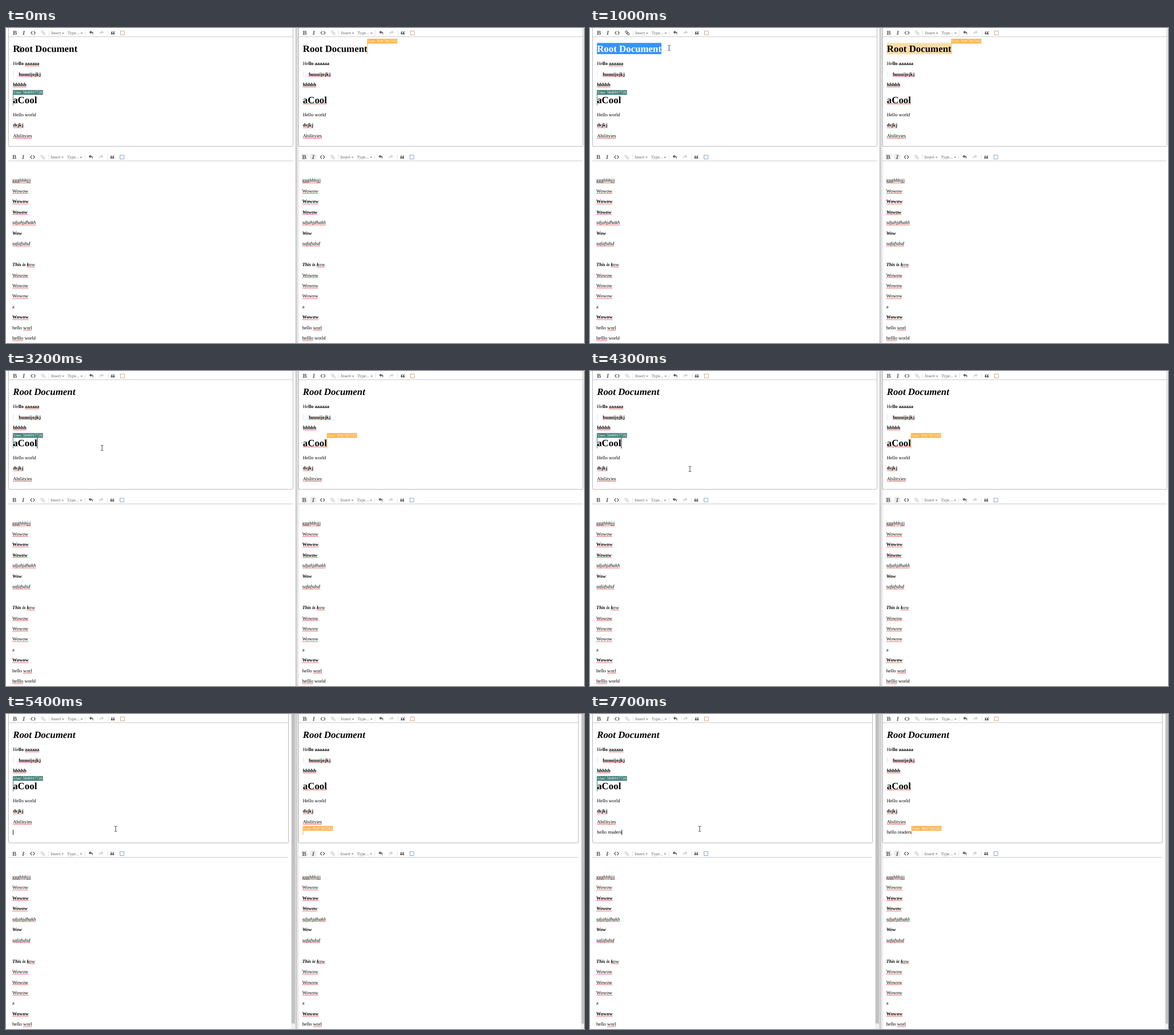
Recreate the animation shown at these times as an HTML page. Size 1012 px wide and 553 px high, loop 8000 ms.

```html
<!DOCTYPE html>
<html lang="en">
<head>
<meta charset="utf-8">
<title>Shared editors</title>
<style>
  html, body { margin: 0; width: 100%; height: 100%; overflow: hidden; background: #fff; }
  svg { display: block; }
  text { font-family: "Liberation Serif", "Times New Roman", serif; white-space: pre; text-rendering: geometricPrecision; }
</style>
</head>
<body>
<svg id="stage" width="1012" height="553" viewBox="0 0 1012 553"></svg>
<script>
const LOOP = 8000;
const BODY = 8.43, HEAD = 16.87, ROW = 18.46, GROW = 18.5;
const SIDE = 507.6, LEFT = 12.2;
const INK = '#5c5c5c', TEAL = '#47807a', ORANGE = '#fbb44b';
const TITLE = 'Root Document', TYPED = 'hello readers';
const stage = document.getElementById('stage');

function set(node, attrs) {
  for (const k in attrs) node.setAttribute(k, attrs[k]);
  return node;
}
function el(parent, tag, attrs = {}) {
  return parent.appendChild(set(document.createElementNS('http://www.w3.org/2000/svg', tag), attrs));
}
function group(parent, x = 0, y = 0) {
  return el(parent, 'g', { transform: `translate(${x} ${y})` });
}
function rect(parent, x, y, width, height, fill, more) {
  return el(parent, 'rect', { x, y, width, height, fill, ...more });
}
function show(node, on) { node.style.display = on ? '' : 'none'; }

// Runs are [string, flags]; flags: b bold, i italic, u misspelt.
function write(parent, x, y, runs, size = BODY) {
  const text = el(parent, 'text', { x, y, 'font-size': size });
  for (const [str, flags = ''] of runs) {
    const span = el(text, 'tspan');
    if (flags.includes('b')) span.setAttribute('font-weight', 'bold');
    if (flags.includes('i')) span.setAttribute('font-style', 'italic');
    span.textContent = str;
    if (flags.includes('u')) {
      const x1 = span.getStartPositionOfChar(0).x, y1 = y + 1.6;
      el(parent, 'line', {
        x1, y1, x2: x1 + span.getComputedTextLength(), y2: y1,
        stroke: '#e04545', 'stroke-width': 0.8
      });
    }
  }
  return text;
}

function toolbar(parent, x, y, frameColor) {
  const g = group(parent, x, y);
  const boldBg = rect(g, 10, 3, 11.5, 10.5, '#ececec', { rx: 2 });
  const italicBg = rect(g, 25.5, 3, 11.5, 10.5, '#ececec', { rx: 2 });
  const glyph = (cx, ch, style) => {
    set(write(g, cx, 12.1, [[ch, style]], 10.8), { 'text-anchor': 'middle', fill: INK });
  };
  glyph(15.6, 'B', 'b');
  glyph(31.2, 'I', 'bi');
  const line = (d, w = 1.3) => el(g, 'path', { d, fill: 'none', stroke: INK, 'stroke-width': w });
  line('M46.4 5.6l-2.6 3 2.6 3M48.6 5.6l2.6 3-2.6 3');

  const link = el(g, 'g', {
    transform: 'translate(65.4 8.6) rotate(45)', fill: 'none', stroke: INK, 'stroke-width': 1.1
  });
  for (const lx of [-4.3, -0.5]) el(link, 'rect', { x: lx, y: -1.5, width: 4.8, height: 3, rx: 1.4 });

  for (const [lx, label, arrow] of [[79, 'Insert', 100], [107.8, 'Type...', 132.4]]) {
    set(write(g, lx, 11.4, [[label]], 7.59), { fill: '#666' });
    el(g, 'path', { d: `M${arrow - 2.1} 8.2h4.2l-2.1 2.2z`, fill: '#888' });
  }
  for (const sx of [75.2, 139, 178.3]) rect(g, sx - 0.3, 4, 0.8, 9.4, '#ddd');

  const arrow = (ax, d, opacity) => el(g, 'path', {
    d, fill: INK, opacity, transform: `translate(${ax} 4.3) scale(.00823)`
  });
  arrow(145.2, 'M761 1024c113-206 132-520-313-509v253l-384-384 384-384v248c534-13 594 472 313 775z', 1);
  arrow(163.2, 'M576 248v-248l384 384-384 384v-253c-446-10-427 303-313 509-280-303-221-789 313-775z', 0.3);

  for (const qx of [183.8, 187.4]) {
    el(g, 'path', { d: `M${qx + 2.8} 5.6q-2.8 .7-2.8 3.6v2h2.9v-2.7h-1.2q0-1.3 1.3-1.9z`, fill: INK });
  }
  el(g, 'rect', {
    x: 200.6, y: 5.2, width: 6.8, height: 6.8, fill: 'none',
    stroke: frameColor, 'stroke-width': 0.9, 'stroke-dasharray': '1.5 .6'
  });
  return (bold, italic, linkOn) => {
    show(boldBg, bold);
    show(italicBg, italic);
    link.setAttribute('opacity', linkOn ? 1 : 0.3);
  };
}

// A collaborator's caret with the name above it.
function userTag(parent, name, color) {
  const g = group(parent);
  rect(g, -0.3, -8.3, 52.8, 8.4, color);
  const caret = rect(g, -0.3, 0, 1, 19, color);
  set(write(g, 0.8, -1.9, [[name]], 6.85), { fill: '#fff' });
  return (x, y, height) => {
    g.setAttribute('transform', `translate(${x} ${y})`);
    caret.setAttribute('height', height);
  };
}

const LOWER = [
  [['ggghhhjjj', 'u']], [['Wowow', 'u']], [['Wowow', 'bu']], [['Wowow', 'biu']],
  [['sdjahjdhakh', 'iu']], [['Wow', 'bi']], [['safafsdsd', 'iu']], [],
  [['This is ', 'bi'], ['k', 'biu'], ['ow', 'u']],
  [['Wowow', 'u']], [['Wowow', 'u']], [['Wowow', 'u']], [['a']], [['Wowow', 'bu']],
  [['hello '], ['worl', 'u']], [['helllo', 'u'], [' world']]
];

function pane(x, isRight) {
  const g = group(stage, x);
  const box = el(g, 'rect', { x: 4.4, y: -5, rx: 2, fill: 'none', stroke: '#b8b8b8', 'stroke-width': 1 });
  const topRule = rect(g, 4.4, 14.8, 498, 0.9, '#c4c4c4');
  const topBar = toolbar(g, 0, 0, '#bd7a3c');

  const selection = rect(g, LEFT, 26.2, 0, 19.7, isRight ? '#fcdda9' : '#3793fb');
  const title = write(g, LEFT, 41.7, [['', 'b'], [TITLE, 'b']], HEAD);
  write(g, LEFT, 65, [['He'], ['llo ', 'b'], ['aaaaaa', isRight ? 'b' : 'bu']]);
  rect(g, 12.4, 76, 1.1, 9.8, '#e4e4e4');
  write(g, 22.3, 83.5, [['huuuijojkj', 'bu']]);
  write(g, LEFT, 102, [['hhhhh', 'bu']]);
  const cool = write(g, LEFT, 131.7, [['aCool', isRight ? 'bu' : 'b']], HEAD);
  write(g, LEFT, 155, [['Hello world']]);
  write(g, LEFT, 173.4, [['dsjkj', 'bu']]);
  const ability = write(g, LEFT, 191.9, [['Abilityies', 'u']]);
  const typed = write(g, LEFT, 210.4, [['']]);

  const lower = group(g);
  toolbar(lower, -1, 218, '#4678b4')(isRight, isRight, false);
  const lowRule = rect(lower, 4, 232.8, 498, 0.9, '#c4c4c4');
  LOWER.forEach((runs, i) => write(lower, 11.1, 270.4 + i * ROW, runs));

  const bar = group(g);
  rect(bar, 498.6, 0, 8, 553, '#f1f1f1');
  rect(bar, 500, 0, 6, 543.5, '#c1c1c1');

  const moveTag = isRight
    ? userTag(g, 'User: 9047365582', ORANGE)
    : userTag(g, 'User: 5840917726', TEAL);
  if (!isRight) moveTag(LEFT, 117.2, 18.6);
  const caret = rect(g, 0, 0, 0.9, 0, '#000');
  const endOf = text => LEFT + text.getComputedTextLength();

  return s => {
    const width = s.grown ? 490.2 : 498.2;
    set(box, { width, height: (s.grown ? GROW : 0) + 212.8 });
    topRule.setAttribute('width', width);
    lowRule.setAttribute('width', width);
    lower.setAttribute('transform', `translate(0 ${s.grown ? GROW : 0})`);
    show(bar, s.grown);
    topBar(false, !isRight && s.italic && s.picked > 0, !isRight && s.picked > 0);

    const [head, tail] = title.children;
    head.textContent = TITLE.slice(0, s.picked);
    tail.textContent = TITLE.slice(s.picked);
    title.style.fontStyle = s.italic ? 'italic' : 'normal';
    head.setAttribute('fill', isRight ? '#000' : '#fff');
    const pickedWidth = s.picked ? head.getComputedTextLength() : 0;
    selection.setAttribute('width', pickedWidth);
    typed.firstChild.textContent = TYPED.slice(0, s.typed);

    const spots = {
      title: [s.picked ? LEFT + pickedWidth : endOf(title), 27.2, 18.8],
      cool: [endOf(cool), 117.2, 18.8],
      ability: [endOf(ability), 186.3, 8],
      typed: [s.typed ? endOf(typed) : LEFT, 204.8, 7.6]
    };
    const [cx, cy, ch] = spots[s.spot];
    if (isRight) {
      moveTag(cx, cy, ch);
      show(caret, false);
    } else {
      const lift = ch < 10 ? 1.6 : 0;
      set(caret, { x: cx - 0.1, y: cy - lift, height: ch + lift });
      show(caret, s.caret);
    }
  };
}

const panes = [pane(0, false), pane(SIDE, true)];

// Edge between the two windows.
const fade = el(el(stage, 'defs'), 'linearGradient', { id: 'edge' });
el(fade, 'stop', { offset: 0, 'stop-color': '#000', 'stop-opacity': 0.26 });
el(fade, 'stop', { offset: 0.4, 'stop-color': '#000', 'stop-opacity': 0.12 });
el(fade, 'stop', { offset: 1, 'stop-color': '#000', 'stop-opacity': 0 });
rect(stage, 506.8, 0, 7.5, 553, 'url(#edge)');

const popup = rect(stage, 136.6, 13.6, 8.4, 8.4, '#4b7fdc', { rx: 1 });
const ring = el(stage, 'circle', {
  cx: 150, cy: 42.2, r: 5.8, fill: '#fff', stroke: '#2a78b8', 'stroke-width': 1.4
});
const mouse = el(stage, 'path', {
  d: 'M-2.2-4.7q2.2 0 2.2 1.2q0-1.2 2.2-1.2M0-3.5v7M-2.2 4.7q2.2 0 2.2-1.2q0 1.2 2.2 1.2',
  fill: 'none', stroke: '#333', 'stroke-width': 0.9
});

// Latest entry whose start time has passed.
function at(list, t) {
  let value = list[0];
  for (const entry of list) if (t >= entry[0]) value = entry;
  return value;
}

const MOUSE = [
  [0, 24.3, 37.4], [200, 13.8, 37.4], [600, 56, 37], [700, 79.6, 36.6], [800, 108, 36],
  [900, 128, 35.5], [1000, 138.5, 35], [1300, 141.2, 34.8], [3000, 168.2, 135],
  [3700, 174.6, 172], [3900, 175, 172], [4500, 186, 195], [4800, 189.6, 204], [5200, 192, 201.6]
];
const PICKED = [[0, 0], [600, 2], [700, 6], [800, 9], [900, 12], [1000, 13], [3200, 0]];
const SPOT = [[0, 'title'], [3200, 'cool'], [4800, 'ability'], [5400, 'typed']];
const KEYS = [
  [0, 0], [5800, 1], [6100, 3], [6300, 4], [6500, 6],
  [6800, 7], [7000, 8], [7200, 10], [7500, 12], [7700, 13]
];

function draw(t) {
  const state = {
    picked: at(PICKED, t)[1],
    italic: t >= 2200,
    spot: at(SPOT, t)[1],
    caret: t >= 3200 && !(t >= 3700 && t < 4300),
    grown: t >= 5400,
    typed: at(KEYS, t)[1]
  };
  panes.forEach(update => update(state));
  const [, mx, my] = at(MOUSE, t);
  mouse.setAttribute('transform', `translate(${mx} ${my})`);
  show(popup, t >= 1300 && t < 3200);
  show(ring, t >= 1300 && t < 3000);
}

const start = performance.now();
function tick() {
  draw((performance.now() - start) % LOOP);
  requestAnimationFrame(tick);
}
tick();
</script>
</body>
</html>
```
